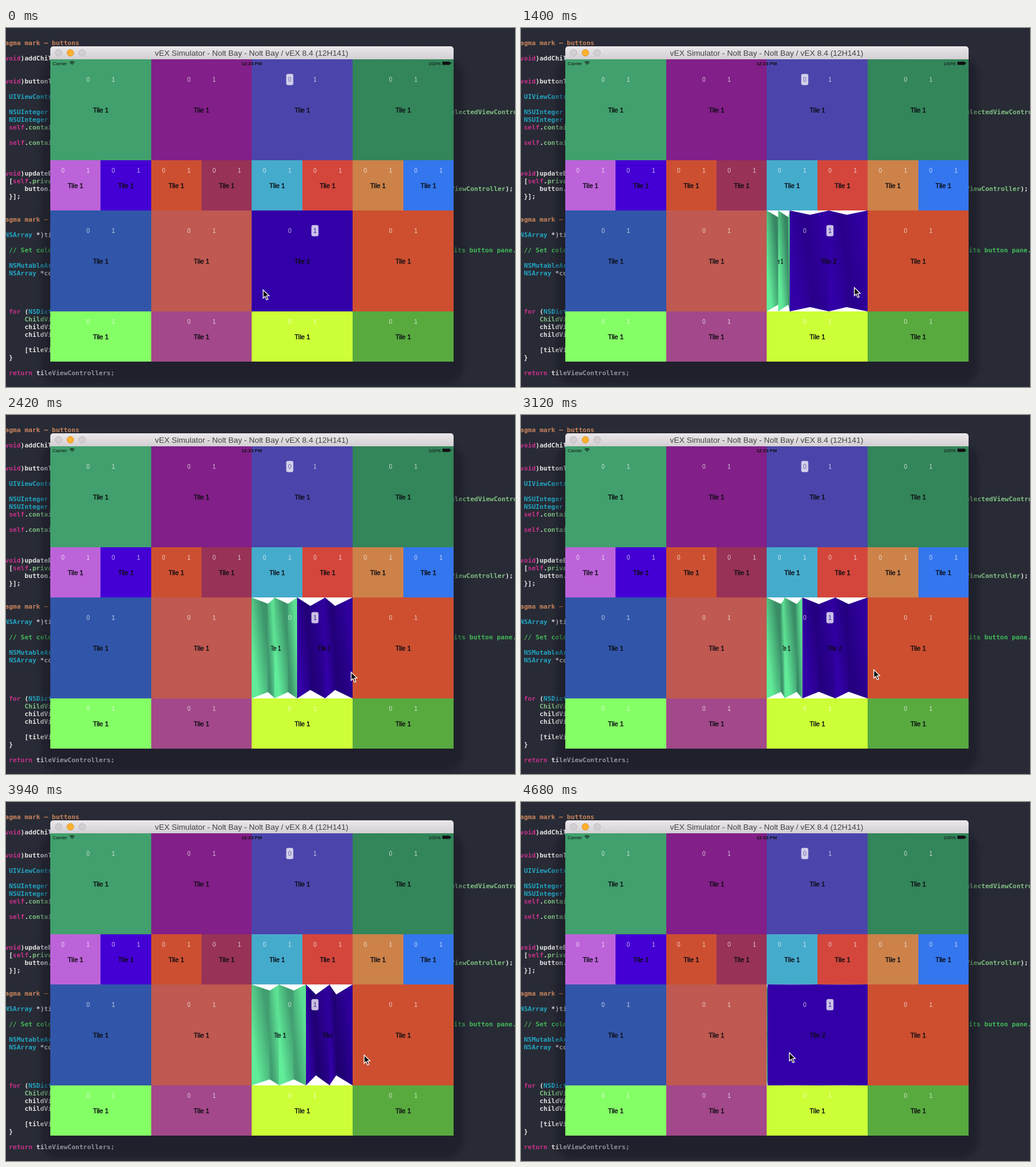
Write an HTML page with a canvas that moves like this. It is 862 px wide and 608 px high and loops after 4.7 s.

```html
<!DOCTYPE html>
<html lang="en">
<head>
<meta charset="utf-8">
<title>Folding tiles</title>
<style>
  html, body { margin: 0; width: 862px; height: 608px; overflow: hidden; background: #282b35; }
  canvas { display: block; }
</style>
</head>
<body>
<canvas id="stage" width="862" height="608"></canvas>
<script>
const ctx = document.getElementById('stage').getContext('2d');
const LOOP = 4700, STEP = 20;
const SANS = '"Liberation Sans", Arial, sans-serif';
const MONO = 'bold 11px "DejaVu Sans Mono", monospace';
const LEFT = 75, WIDTH = 683, ADVANCE = 6.62;

// Code colours: keyword, type, member, plain, comment, directive
const INK = { k: '#c7308c', t: '#22a5c3', m: '#80c183', w: '#e4e4e4', c: '#43b85b', d: '#c8835c' };

// [row, column, ink, text, ink, text, ...]
const CODE = [
  [0, 0, 'd', '#pragma mark – buttons'],
  [2, 0, 'w', '- (', 'k', 'void', 'w', ')addChild'],
  [5, 0, 'w', '- (', 'k', 'void', 'w', ')buttonTap'],
  [7, 4, 't', 'UIViewContro'],
  [9, 4, 't', 'NSUInteger'],
  [10, 4, 't', 'NSUInteger'],
  [11, 4, 'k', 'self', 'w', '.', 'm', 'contain'],
  [13, 4, 'k', 'self', 'w', '.', 'm', 'contain'],
  [17, 0, 'w', '- (', 'k', 'void', 'w', ')updateBu'],
  [18, 4, 'w', '[', 'k', 'self', 'w', '.', 'm', 'privat'],
  [19, 8, 'w', 'button.s'],
  [20, 4, 'w', '}];'],
  [23, 0, 'd', '#pragma mark – tiles'],
  [25, 0, 'w', '- (', 't', 'NSArray', 'w', ' *)tile'],
  [27, 4, 'c', '// Set color'],
  [29, 4, 't', 'NSMutableArr'],
  [30, 4, 't', 'NSArray', 'w', ' *col'],
  [35, 4, 'k', 'for', 'w', ' (', 't', 'NSDicti'],
  [36, 8, 'm', 'ChildVie'],
  [37, 8, 'w', 'childVie'],
  [38, 8, 'w', 'childVie'],
  [40, 8, 'w', '[tileVie'],
  [41, 4, 'w', '}'],
  [43, 4, 'k', 'return', 'w', ' tileViewControllers;'],
  [9, 116, 'm', 'selectedViewController'],
  [19, 117, 'm', 'ViewController', 'w', ');'],
  [27, 117.8, 'c', 'its button pane.']
];

// [top, height, colours]; null is the folding tile
const ROWS = [
  [53, 171, ['#41a06d', '#821f88', '#4b45ab', '#33855a']],
  [224, 85, ['#bd63da', '#4400d4', '#cd4f31', '#983257', '#45abcc', '#d4463c', '#cc8249', '#3376ee']],
  [309, 171, ['#3156a9', '#bf5951', null, '#cd4f30']],
  [480, 85, ['#85ff66', '#a3488a', '#ccff37', '#58aa3f']]
];

// Time, cursor x, cursor y, fold position
const KEYS = [
  [0, 435, 443, 0],
  [1400, 564, 439, 39],
  [1880, 656, 437, 118],
  [2420, 584, 435, 77],
  [3120, 597, 431, 60.5],
  [3940, 606, 428, 92],
  [4680, 454, 424, 1.5]
];

const FOLD = { x: 416, y: 309, w: 171, h: 171 };
const LEAF = FOLD.w / 4;

// Monotone cubic through the keys
function track(t, col) {
  const slope = i => (KEYS[i + 1][col] - KEYS[i][col]) / (KEYS[i + 1][0] - KEYS[i][0]);
  const last = KEYS.length - 1;
  const tangent = i => {
    if (i === 0) return 0;
    if (i === last) return slope(last - 1);
    const a = slope(i - 1), b = slope(i);
    return a * b > 0 ? 2 * a * b / (a + b) : 0;
  };
  let i = 0;
  while (i < last - 1 && t >= KEYS[i + 1][0]) i++;
  const [a, b] = [KEYS[i], KEYS[i + 1]];
  const d = b[0] - a[0], u = Math.min(1, (t - a[0]) / d), v = 1 - u;
  return a[col] * (1 + 2 * u) * v * v + b[col] * (3 - 2 * u) * u * u
    + d * u * v * (tangent(i) * v - tangent(i + 1) * u);
}

function text(str, x, y, font, color, align = 'center') {
  ctx.font = font;
  ctx.fillStyle = color;
  ctx.textAlign = align;
  ctx.fillText(str, x, y);
}

// Tile caption in a medium weight
function caption(str, x, y) {
  text(str, x, y, '11px ' + SANS, '#0c0c12');
  ctx.strokeStyle = '#0c0c12';
  ctx.lineWidth = .4;
  ctx.strokeText(str, x, y);
}

function rect(x, y, w, h, color, radius = 0) {
  ctx.fillStyle = color;
  ctx.beginPath();
  ctx.roundRect(x, y, w, h, radius);
  ctx.fill();
}

function poly(points) {
  ctx.beginPath();
  points.forEach(([x, y]) => ctx.lineTo(x, y));
  ctx.closePath();
}

function drawCode() {
  rect(0, 0, 862, 608, '#282b35');
  for (const [row, col, ...parts] of CODE) {
    let x = -21.5 + col * ADVANCE;
    for (let i = 0; i < parts.length; i += 2) {
      text(parts[i + 1], x, 29 + row * 13, MONO, INK[parts[i]], 'left');
      x += parts[i + 1].length * ADVANCE;
    }
  }
}

function drawWindow() {
  ctx.save();
  ctx.filter = 'blur(4px)';
  rect(59, 50, 716, 554, 'rgba(18,19,30,.4)', 30);
  ctx.restore();
  const bar = ctx.createLinearGradient(0, 31, 0, 53);
  bar.addColorStop(0, '#ebe8eb');
  bar.addColorStop(1, '#d3cfd3');
  rect(LEFT, 31, WIDTH, 22, bar, [5, 5, 0, 0]);
  ['#d2ced2', '#fdb02e', '#d2ced2'].forEach((color, i) => {
    ctx.beginPath();
    ctx.arc(89 + i * 20, 42, 5.6, 0, 7);
    ctx.fillStyle = color;
    ctx.fill();
    ctx.strokeStyle = i === 1 ? '#dd962a' : '#bfbbbf';
    ctx.lineWidth = 1;
    ctx.stroke();
  });
  text('vEX Simulator - Nolt Bay - Nolt Bay / vEX 8.4 (12H141)', 416, 47, '13.4px ' + SANS, '#454345');
}

function drawButtons(x, y, w, h, spread, chosen, chosenInk) {
  for (const n of [0, 1]) {
    const cx = x + w * (.5 + (n - .5) * spread), cy = y + h * .2;
    const on = n === chosen;
    if (on) rect(cx - 6, cy - 9.5, 12, 19, 'rgba(255,255,255,.75)', 3);
    text(n, cx, cy + 3.5, '10px ' + SANS, on ? chosenInk : 'rgba(255,255,255,.72)');
  }
}

function drawTiles(split) {
  ROWS.forEach(([y, h, colors], r) => {
    const w = WIDTH / colors.length, spread = r === 1 ? .5 : .25;
    const edge = i => Math.floor(LEFT + i * w + .49);
    colors.forEach((color, i) => {
      const x = LEFT + i * w;
      if (color) {
        rect(edge(i), y, edge(i + 1) - edge(i), h, color);
        caption('Tile 1', x + w / 2, y + h / 2 + 4);
      } else {
        drawFold(split);
      }
      const chosen = r === 0 && i === 2 ? 0 : color ? -1 : 1;
      const ink = color ? '#6a66aa' : split > 107 ? '#e2f8ea' : '#30208f';
      drawButtons(x, y, w, h, spread, chosen, ink);
    });
  });
}

// One sheet folded into four leaves; odd creases recede from the viewer
function drawSheet(x, width, style) {
  if (width < .5) return;
  const leaf = width / 4, depth = Math.sqrt(Math.max(0, 1 - (leaf / LEAF) ** 2));
  const drop = style.drop(leaf, depth), half = FOLD.h / 2;
  const centre = FOLD.x + FOLD.w / 2;
  const top = FOLD.y, mid = top + half, bottom = top + FOLD.h;
  const edges = [0, 1, 2, 3, 4].map(i => {
    const flat = x + i * leaf;
    if (i % 2 === 0) return { x: flat, dy: 0 };
    const moved = flat + (centre - flat) * drop / half * style.pull;
    return { x: Math.max(flat - leaf, Math.min(flat + leaf, moved)), dy: drop };
  });
  for (let i = 0; i < 4; i++) {
    const a = edges[i], b = edges[i + 1], span = b.x - a.x;
    if (span < .05) continue;
    const right = b.x + (i < 3 ? 1 : 0);
    ctx.save();
    poly([[a.x, top + a.dy], [right, top + b.dy], [right, bottom - b.dy], [a.x, bottom - a.dy]]);
    ctx.clip();
    const fill = color => rect(a.x - 2, top, span + 5, FOLD.h, color);
    fill(style.color);
    const tilt = span * Math.min(.15, span / 200);
    const shade = ctx.createLinearGradient(a.x, mid + tilt / 2, b.x, mid - tilt / 2);
    const dark = depth * depth * style.shade;
    const [from, to] = i % 2 ? [dark, dark * style.back] : [0, dark];
    shade.addColorStop(0, `rgba(0,0,30,${from})`);
    shade.addColorStop(1, `rgba(0,0,30,${to})`);
    fill(shade);
    // The caption sits on the front crease, where the sheet looks widest
    ctx.translate(edges[2].x, 0);
    ctx.scale(Math.min(1, 1.6 * span / LEAF), 1);
    if (i === 1 || i === 2) caption(style.label, 0, mid + 4);
    ctx.restore();
  }
}

const GREEN = {
  color: '#61ec99', label: 'Tile 1', shade: .46, back: .15, pull: .95,
  drop: (leaf, depth) => FOLD.h / 2 * depth * LEAF / (258 + depth * LEAF)
};
const PURPLE = {
  color: '#3300a8', label: 'Tile 2', shade: .5, back: .25, pull: .65,
  drop: leaf => .76 * (LEAF - leaf)
};

function drawFold(split) {
  rect(FOLD.x, FOLD.y, FOLD.w, FOLD.h, '#fff');
  drawSheet(FOLD.x, split, GREEN);
  drawSheet(FOLD.x + split, FOLD.w - split, PURPLE);
}

function drawStatus() {
  const ink = '#101014';
  text('Carrier', 79, 63, '8px ' + SANS, ink, 'left');
  text('12:23 PM', 416, 63, 'bold 8px ' + SANS, ink);
  text('100%', 736, 63, '8px ' + SANS, ink, 'right');
  rect(739, 57, 13, 5.5, ink, 1);
  rect(752.5, 58.5, 1.5, 2.5, ink);
  ctx.strokeStyle = ink;
  ctx.lineWidth = 1.1;
  for (const r of [1, 3.3, 5.6]) {
    ctx.beginPath();
    ctx.arc(112, 62.5, r, -2.4, -.74);
    ctx.stroke();
  }
}

function drawCursor(x, y) {
  ctx.save();
  ctx.translate(x + .5, y + .5);
  poly([[0, 0], [0, 14], [3.2, 11], [5.8, 17], [8.2, 16], [5.7, 10.2], [10, 10]]);
  ctx.fillStyle = '#000';
  ctx.strokeStyle = '#fff';
  ctx.lineWidth = 1.3;
  ctx.fill();
  ctx.stroke();
  ctx.restore();
}

function frame() {
  const t = Math.floor(performance.now() % LOOP / STEP) * STEP;
  drawCode();
  drawWindow();
  drawTiles(track(t, 3));
  drawStatus();
  drawCursor(track(t, 1), track(t, 2));
  requestAnimationFrame(frame);
}
frame();
</script>
</body>
</html>
```
